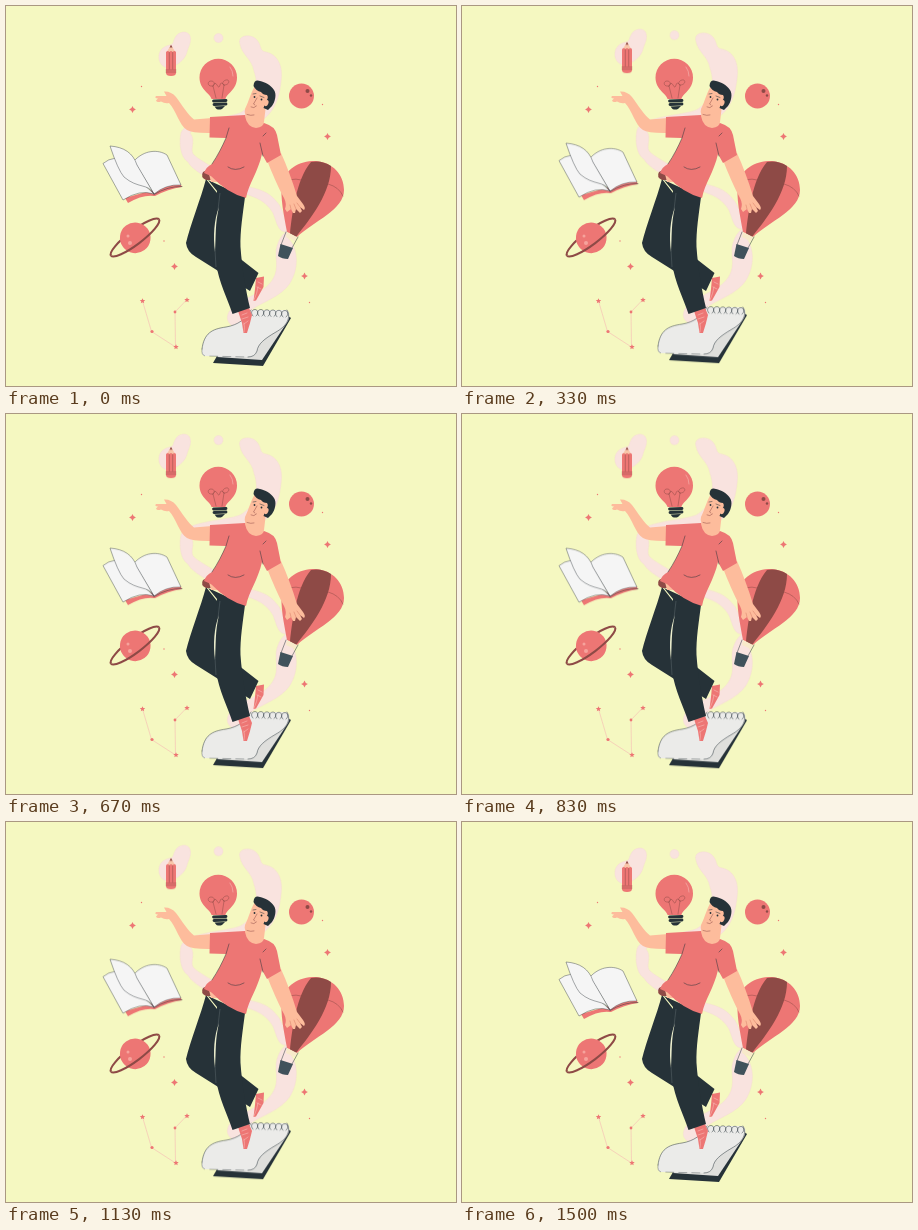
An HTML page for the animation above (1.54 s loop, 450 by 380 pixels).

```html
<!DOCTYPE html>
<html lang="en">
<head>
<meta charset="utf-8">
<title>Floating ideas</title>
<style>
  html, body { margin: 0; width: 100%; height: 100%; overflow: hidden; background: #f5f8c1; }
  svg { display: block; width: 450px; height: 380px; }
  .float { animation: lift 770ms cubic-bezier(.37, 0, .63, 1) -40ms infinite alternate; }
  @keyframes lift { to { transform: translateY(-6px); } }
  .red { fill: #ed7674; }
  .dark { fill: #263238; }
  .maroon { fill: #8e4a46; }
  .skin { fill: #fdbc9c; }
  .blush { fill: #f9e3df; stroke: #f5d6d3; stroke-width: .4; }
  .paper { fill: #f5f5f5; stroke: #3a4247; stroke-width: .45; stroke-linejoin: round; }
  .line { fill: none; stroke: #263238; stroke-width: .5; stroke-linecap: round; }
  .crease { fill: none; stroke: #8e4a46; stroke-width: .5; stroke-linecap: round; }
  .pale { fill: none; stroke: #f6b9b4; stroke-width: .6; stroke-linecap: round; }
</style>
</head>
<body>
<svg viewBox="0 0 450 380">
  <defs>
    <path id="spark" d="M0-3.4Q.6-.6 3.4 0Q.6.6 0 3.4Q-.6.6-3.4 0Q-.6-.6 0-3.4Z"/>
    <path id="star" d="M0-2.8L.8-1L2.7-.9L1.2.4L1.7 2.3L0 1.2L-1.7 2.3L-1.2.4L-2.7-.9L-.8-1Z"/>
    <path id="ring" d="M-2 4C-5 1-3-2.500 0-2.500S4 2 1 4"/>
  </defs>

  <g class="float">
    <g class="blush">
      <path d="M169 32C172 25 182 24 184 30C186 36 182 41 181 46C179 53 174 57 168 60C161 64 154 60 153 53C152 44 158 40 164 39C168 38 167 35 169 32Z"/>
      <circle cx="212.500" cy="32" r="4.500"/>
      <path d="M234 38C231 29 245 27 251 34C256 40 253 45 260 46C270 48 276 57 275.500 70C274 91 269 107 253 116C231 124 186 120 184 127C190 134 184 142 187 148C193 154 202 158 211 164L206 174C196 169 185 162 182 156C174 151 173 136 175 127C180 113 218 113 234 107C249 99 254 82 248 65C246 53 236 49 234 38Z"/>
      <path d="M236 180C252 182 263 186 270 195C278 203 281 218 281 231C291 240 293 257 287 271C281 288 261 294 248 302C239 308 236 323 227 320C218 315 221 306 228 300C240 291 260 286 267 273C274 262 268 250 271 240Q274 230 280 226C272 226 271 217 267 207C260 195 250 191 236 187Z"/>
    </g>

    <g id="pencil">
      <path fill="#f8c5a9" d="M160 47L165 39L170 47Z"/>
      <path class="maroon" d="M163.600 41.400L165 38.700L166.500 41.400Z"/>
      <path class="red" d="M160 46Q162 44 163.300 46Q165 44 166.700 46Q168.500 44 170 46V67Q170 70 165 70Q160 70 160 67Z"/>
      <path class="crease" d="M163.300 46.500V63M166.700 46.500V63M160 64H170M160 66H170"/>
    </g>

    <g id="book">
      <path class="red" d="M119 192L122 197Q137 188 149 190Q162 183 176 181L174 177L147 184Z"/>
      <path class="paper" d="M97 157.500Q102 153 110 152L148 188Q134 183 117 194Z"/>
      <path class="paper" d="M148 188L128 155C138 144 152 143 161 149L175 179Q160 178 148 188Z"/>
      <path class="paper" d="M148 188C142 177 132 183 118 171Q112 164 104 140C118 141 127 147 131 159Z"/>
      <path class="line" d="M148 188.500Q162 180 176 180.500"/>
    </g>

    <g id="pad">
      <path class="dark" d="M281 309L285 312L257 360L207 357L211 350Z"/>
      <path fill="#dfdfdc" d="M246 305H282Q285 308 282 315L256 354L211 351Z"/>
      <path fill="#ebebe9" d="M245 304H281C286 313 279 321 270 326C258 333 252 338 251 345Q249 351 242 351L199 350Q195 350 196 343C198 327 206 323 220 321C232 319 240 313 245 304Z"/>
      <path class="line" d="M196 343C198 327 206 323 220 321C232 319 240 313 245 304M281 304C286 313 279 321 270 326C258 333 252 338 251 345Q249 351 242 351"/>
      <path class="line" stroke-dasharray="8 5" opacity=".7" d="M196 343Q195 350 200 350L242 351"/>
      <g class="line">
        <use href="#ring" x="249" y="306"/><use href="#ring" x="255" y="306"/>
        <use href="#ring" x="261" y="306.300"/><use href="#ring" x="267" y="306.500"/>
        <use href="#ring" x="273" y="306.800"/><use href="#ring" x="279" y="307"/>
      </g>
    </g>
  </g>

  <g id="sky" class="red" transform="translate(-.5)">
    <use href="#spark" x="127" y="103.500"/><use href="#spark" x="322" y="130.500"/>
    <use href="#spark" x="169" y="260.500"/><use href="#spark" x="299" y="270"/>
    <circle cx="136" cy="80.500" r=".7"/><circle cx="317" cy="98.500" r=".7"/>
    <circle cx="158.500" cy="235" r=".7"/><circle cx="304" cy="296.500" r=".7"/>
    <path class="pale" d="M137 295L146 325.500L170 341L169.500 306L181 294"/>
    <use href="#star" x="137" y="295"/><use href="#star" x="181.500" y="294"/>
    <use href="#star" x="170.500" y="341"/>
    <circle cx="146.500" cy="325.500" r="1.600"/><circle cx="169.500" cy="306" r="1.400"/>
  </g>

  <g id="planet">
    <circle class="red" cx="295.500" cy="90" r="12.500"/>
    <g class="maroon"><circle cx="301.500" cy="85" r="2"/><circle cx="305" cy="89.500" r="1.200"/></g>
  </g>

  <g id="ringed">
    <g transform="translate(129 231.500) rotate(-37)" fill="none" stroke="#8e4a46" stroke-width="2.100">
      <path d="M-30 0A30 7 0 0 1 30 0"/>
      <circle class="red" cy=".4" r="15.300" stroke="none"/>
      <path d="M-30 0A30 7 0 0 0 30 0"/>
    </g>
    <g fill="#f6a39c"><circle cx="122" cy="230" r="1.500"/><circle cx="124" cy="237" r="2"/></g>
  </g>

  <g id="bulb">
    <path class="red" d="M205.500 93C205 88 193.500 84 193.500 71.500A18.700 18.700 0 0 1 231 71.500C231 84 220 88 219.500 93Z"/>
    <path class="crease" d="M210 92L207 80C201 81 201 75 205 75S209 79 207 80M216 92L218 79C224 79 224 73 220 74S216 79 218 79M207 80Q209 75 211 79T214 79T218 79"/>
    <path class="pale" d="M224 61Q227 65 227 70"/>
    <path fill="none" stroke="#263238" stroke-width="2.800" stroke-linecap="round" d="M207.500 95L220 94.500M208 98.500L220 98"/>
    <path class="dark" d="M208.500 100.500L219 100L216 103Q213 104 210.500 103Z"/>
  </g>

  <g id="balloon">
    <path class="red" d="M281 226C278 209 274 192 276 178C279 163 293 155 309 155C327 156 338 169 338 184C338 204 308 215 291 231Z"/>
    <path class="maroon" d="M284 227.500C286 210 290 173 305 156Q316 154 325 160C325 187 305 212 290 231Z"/>
    <path class="crease" d="M277 178Q285 171 295 174Q312 171 322 178Q333 181 337 190"/>
    <path fill="#f8eaca" d="M281 226L291 231L289 235L280 231Z"/>
    <path class="line" d="M280 226L275 239M292 231L286 242"/>
    <path d="M274.500 238L287 242L282 253Q276 253 272 250Z" fill="#40525b"/>
  </g>

  <g id="person">
    <path class="red" d="M250 272L258 270.500L257.500 281L250 294.500L247.500 295L249 283Z"/>
    <path class="pale" d="M252 276L256 278M251 281L255 283M248 294Q251 288 252 281"/>
    <path class="dark" d="M200 173C195 192 184 220 180 237Q181 246 190 251L244 285L252.500 267L232 251L211 187Z"/>
    <path class="red" d="M232 305L243 302L246 309Q244 318 241 327L237.500 327L236 317Z"/>
    <path class="pale" d="M236 309L241 307M236 313L242 311M238 318L242 315M238 326Q239 321 238 317"/>
    <path class="dark" d="M202 174L239 191C237 207 234 225 234.500 241C236 263 240 285 244 302L226.500 308C221 291 213 277 210 257C207 235 209 208 211 185Z"/>
    <path fill="#eef0cf" d="M213 201C208 214 207 230 209 246C210 231 209 217 213 201Z"/>
    <path fill="none" stroke="#5d686d" stroke-width=".5" d="M214 187Q213 195 212 204M209 244L210 261"/>

    <path class="skin" d="M206 112L188 113.500C182 109 176 99 170 91Q165 85 158 85.500L160.500 90L150 90Q148 92 152 92.500L150 94.500Q151 97 155 95.500Q159 98 163 97C170 104 173 119 181 124Q186 127.500 207 127Z"/>
    <path class="skin" d="M261 154C266 167 272 181 278 192Q281 198 279 203L281 206L285 203L287 207L289 207L290 203L294 207L296 205L294 201L298 204Q300 202 297 198L291 190C286 174 281 160 275 147Z"/>
    <path class="crease" style="stroke:#d77c67" d="M285 203L284 199M290 203L288 198M294 201L291 197"/>

    <path class="maroon" d="M197 166Q194 171 200 174L206 174L205 162Z"/>
    <path class="skin" d="M203 168L213 176L205 176Z"/>
    <path class="red" d="M204 111L239 109Q249 119 258 117Q269 120 271 129L275 149L261 157L256 148C252 166 243 177 240 192Q221 187 205 170L198 167Q200 161 206 158C212 149 216 141 220 132L203.500 131.500Z"/>
    <path class="line" d="M223 122L220 132C216 141 212 149 206 158M254 137L257 150M222 161Q229 166 238 161M257 130L260 127"/>

    <path class="skin" d="M240 104L239 110Q241 121 250 122Q258 121 258 116L260 99Z"/>
    <path class="skin" d="M249 80C245 86 243 95 239 103Q237.500 109 243 110Q252 110 259 103L265 88Z"/>
    <path class="dark" d="M247.500 80Q248 73 254 75C259 76 265 79 268 84C271 88 269 96 266 100L262 104L257.500 102L260 95Q263 92 261 89Q257 89 255 86Q250 85 247.500 80Z"/>
    <ellipse class="skin" cx="260.200" cy="97" rx="2.200" ry="3.200" transform="rotate(20 260 97)"/>
    <g class="dark"><circle cx="248.500" cy="91" r=".9"/><circle cx="255.500" cy="93.500" r=".9"/></g>
    <path class="line" d="M247 88L250 87.500M254 90L258 91.500"/>
    <path class="crease" d="M251 92L247.500 98L249 99M245 101Q248 103 250.500 100M241 108.500Q245 110 248 109"/>
  </g>
</svg>
</body>
</html>
```
